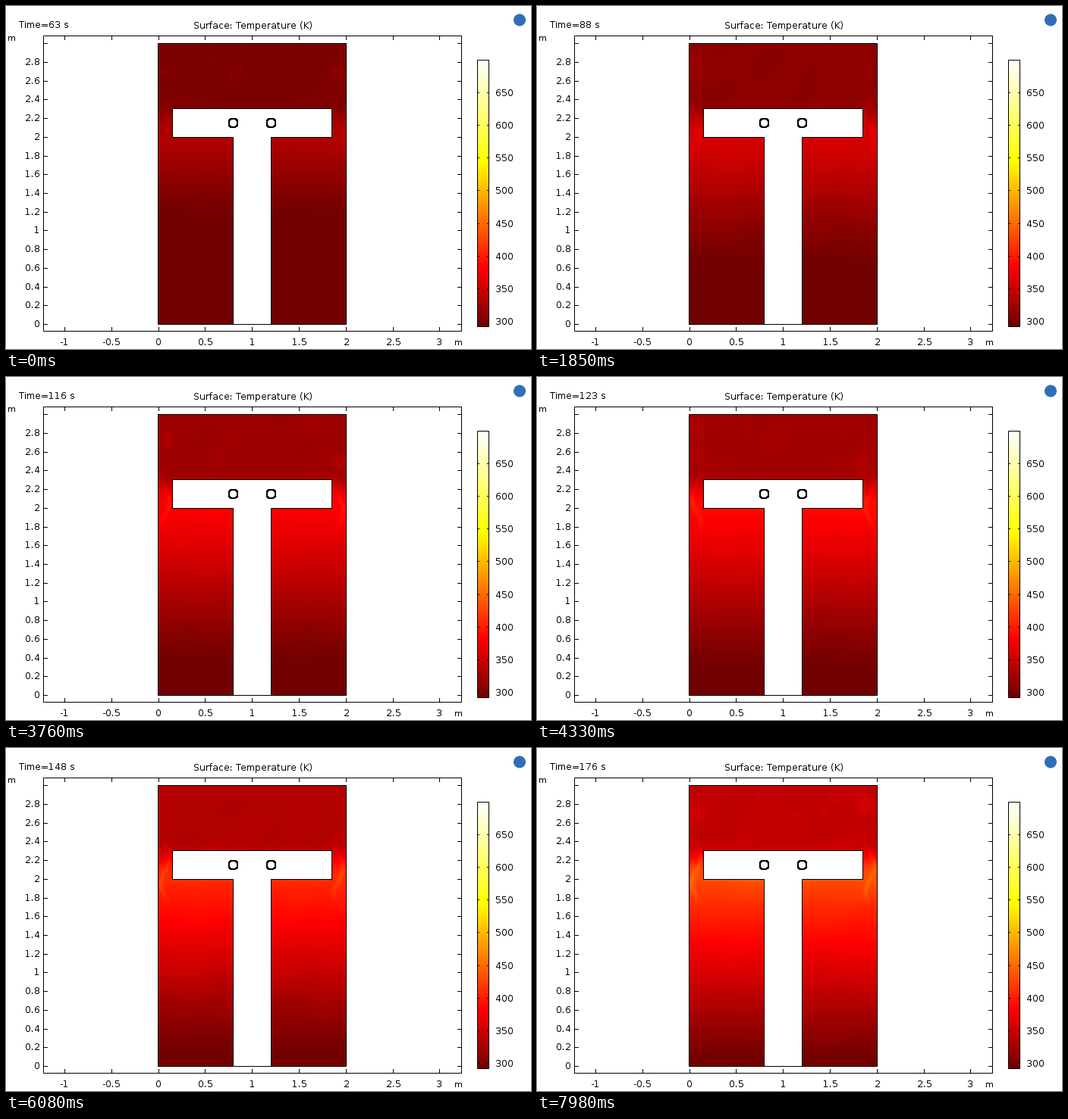
A matplotlib script that plays this animation: 692x453 px, repeating every 8 s.

```python
import numpy as np
import matplotlib.pyplot as plt
from matplotlib.animation import FuncAnimation
from matplotlib.colors import LinearSegmentedColormap
from matplotlib.patches import Circle, Polygon

W, H, DPI = 692, 453, 64
PX = 72 / DPI                      # points per pixel
LOOP, INTERVAL = 8000, 20
SCALE = 123.6                      # pixels per metre
X0, Y0 = 201, 420.5                # pixel position of the model origin
COLD, HOT = 293, 700

# The solver's pace varies a little: steps done and seconds simulated over time
PACE_MS = [0, 1850, 3070, 4330, 5290, 6910, 7980]
PACE_STEP = [0, 13, 22, 31, 38, 49, 57]
PACE_CLOCK = [63, 88, 107, 123, 138, 161, 176]

plt.rcParams.update({"font.family": "DejaVu Sans", "text.hinting": "default",
                     "text.hinting_factor": 1})
thermal = LinearSegmentedColormap.from_list("thermal", [
    (0, (0.45, 0, 0)), (0.22, (1, 0, 0)), (0.62, (1, 1, 0)), (1, (1, 1, 1))], N=512)

px, py = np.meshgrid(np.arange(201, 448) + 0.5, np.arange(50, 420) + 0.5)
height = (Y0 - py) / SCALE
wall = np.minimum(px - 200.5, 448.5 - px)
stem = np.maximum(np.maximum(299.5 - px, px - 349.5), 0)
below = py > 173
under_bar = below & (px > 219) & (px < 430)

rng = np.random.default_rng(8)
waves = rng.normal(0, 1, (7, 2)) * (0.045, 0.06)
phases = rng.uniform(0, 2 * np.pi, 7)


def random_eddy(birth, x, kelvin):
    return (birth, x, rng.uniform(65, 125), rng.uniform(6, 13), rng.uniform(8, 18),
            kelvin * rng.uniform(0.4, 1))


# Warm eddies: strong ones along the walls, faint ones in the middle
eddies = []
for birth in range(0, 60, 3):
    eddies += [random_eddy(birth, 207 + rng.uniform(0, 8), 11),
               random_eddy(birth, 441 - rng.uniform(0, 14), 12),
               random_eddy(birth, rng.uniform(230, 420), 7)]


def smooth(v):
    v = np.clip(v, 0, 1)
    return v * v * (3 - 2 * v)


def noise(step):
    """Slowly drifting smooth noise with folded contours."""
    drift = 0.21 * step
    fold = 9 * np.sin(px / 31 + py / 23 + drift)
    return sum(np.cos(kx * (px + fold) + ky * (py - fold) + phase + drift * (1 + i % 3))
               for i, ((kx, ky), phase) in enumerate(zip(waves, phases))) / 3


def temperature(step, seconds):
    s = (seconds - PACE_CLOCK[0]) / (PACE_CLOCK[-1] - PACE_CLOCK[0])
    heat = 38 + 99 * s ** 0.9
    front = 1.12 * np.exp(-2.6 * s)
    linear = 0.35 + 0.6 * s
    ripple = noise(step)

    # stratified hot layer growing downwards under the bar
    u = np.clip((height + 0.025 * ripple - front) / (2 - front), 0, 1)
    low = COLD + heat * ((1 - linear) * smooth(u) + linear * u)
    high = 300 + 44 * s + 1.6 * ripple
    lift = smooth((height - 2.05) / 0.35)
    t = low * (1 - lift) + high * lift

    # hot skin along the bar, the stem and the outer walls
    t += under_bar * 0.22 * heat * np.exp(-(py - 173) / 1.8)
    t += below * 0.10 * heat * u * np.exp(-stem / 2)
    t += below * 0.06 * heat * smooth((height - 1.1) / 0.6) * np.exp(-wall / 2.5)

    # plumes winding up through the side gaps
    for edge, sign, shift in ((201, 1, 0), (448, -1, 2)):
        path = edge + sign * (9 + 6 * np.sin(py / 11 + step * 0.9 + shift))
        reach = smooth((py - 95) / 60) * smooth((212 - py) / 25)
        t += 0.14 * heat * reach * np.exp(-((px - path) / 3.5) ** 2)

    for birth, x, y, rx, ry, kelvin in eddies:
        weight = 1 - abs(step - birth) / 4
        if weight > 0:
            d = ((px - x) / rx) ** 2 + ((py - y + 4 * (step - birth)) / ry) ** 2
            t += weight * kelvin * np.exp(-d * d)
    return COLD + np.round((t - COLD) / 2.5) * 2.5


fig = plt.figure(figsize=(W / DPI, H / DPI), dpi=DPI, facecolor="white")
ax = fig.add_axes([0, 0, 1, 1])
ax.axis("off")


def line(xs, ys):
    ax.plot(xs, ys, color="black", lw=PX, snap=False, solid_capstyle="butt")


def label(x, middle, text, ha="center", size=12):
    return ax.text(x, middle + 4.5, text, ha=ha, va="baseline", fontsize=size * PX)


def outline(points, fill="none"):
    ax.add_patch(Polygon(points, fc=fill, ec="black", lw=PX, snap=False, joinstyle="miter"))


def box(x1, y1, x2, y2):
    outline([(x1, y1), (x2, y1), (x2, y2), (x1, y2)])


image_style = dict(cmap=thermal, vmin=COLD, vmax=HOT, interpolation="nearest", aspect="auto")
surface = ax.imshow(np.zeros(px.shape), extent=(201, 448, 420, 50), **image_style)
ax.imshow(np.linspace(HOT, COLD, 352)[:, None], extent=(621, 636, 423, 71), **image_style)

# model geometry
box(200.5, 49.5, 448.5, 420.5)
outline([(299.5, 420.5), (299.5, 173.5), (219.5, 173.5), (219.5, 135.5), (429.5, 135.5),
         (429.5, 173.5), (349.5, 173.5), (349.5, 420.5)], "white")
for cx in (299.5, 349.5):
    ax.add_patch(Circle((cx, 154.5), 6, fc="white", ec="black", lw=PX, aa=False, snap=False))

# axes
box(49.5, 39.5, 600.5, 429.5)
for i in range(-2, 7):
    x = int(X0 + i * SCALE / 2) + 0.5
    line([x, x], [40, 45])
    line([x, x], [424, 429])
    label(x, 443.5, f"{i / 2:g}")
for i in range(16):
    y = int(Y0 - i * SCALE / 5) + 0.5
    line([50, 55], [y, y])
    line([595, 600], [y, y])
    if i < 15:
        label(45, y - 1, f"{i / 5:g}", "right")
label(7.5, 41, "m", size=11)
label(596.5, 443.5, "m", size=11)

# colour scale
box(621.5, 71.5, 636.5, 423.5)
for kelvin in range(300, 651, 50):
    y = int(423 - (kelvin - COLD) * 352 / (HOT - COLD)) + 0.5
    line([622, 624], [y, y])
    line([634, 636], [y, y])
    label(645, y, str(kelvin), "left")

label(247, 25.5, "Surface: Temperature (K)", "left")
clock = label(17, 24.5, "", "left")
ax.add_patch(Circle((677, 18.5), 8, fc="#2f6fb5", ec="none"))
ax.set_xlim(0, W)
ax.set_ylim(H, 0)

fields = {}


def update(frame):
    now = frame * INTERVAL + INTERVAL / 2
    step = int(np.interp(now, PACE_MS, PACE_STEP))
    seconds = np.interp(step, PACE_STEP, PACE_CLOCK)
    if step not in fields:
        fields[step] = temperature(step, seconds)
    surface.set_data(fields[step])
    clock.set_text(f"Time={seconds:.0f} s")
    return surface, clock


anim = FuncAnimation(fig, update, frames=LOOP // INTERVAL, interval=INTERVAL,
                     repeat=True, repeat_delay=0)
plt.show()
```
